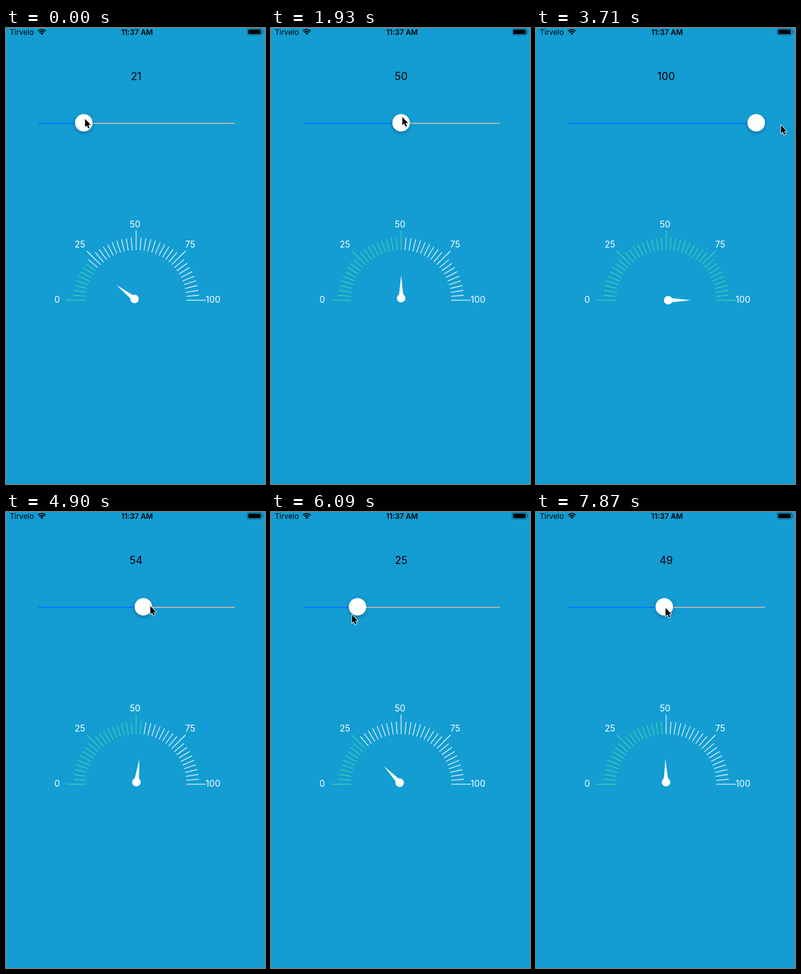
An HTML page with a canvas that plays this animation: 412 by 727 pixels, repeating every 8000 ms.

```html
<!DOCTYPE html>
<html lang="en">
<head>
<meta charset="utf-8">
<title>Gauge and slider</title>
<style>
  html, body { margin: 0; width: 100%; height: 100%; overflow: hidden; background: #139dd3; }
  canvas { display: block; }
</style>
</head>
<body>
<canvas id="stage" width="412" height="727"></canvas>
<script>
const ctx = document.getElementById('stage').getContext('2d');
const LOOP = 8000;
const STEP = 148.5;   // the picture advances in steps of this many ms
const LAG = 0.4;      // the thumb trails the hand by this many steps
const GRIP = 2;       // the pointer sits this far right of the thumb centre
const CENTER = { x: 207, y: 434 };
const FONT = 'Inter, Roboto, sans-serif';

// Where the hand pauses or turns: [step, gauge value], may pass both slider ends.
const HAND = [
  [0, 21.05], [5.6, 36.1], [12.6, 50.05], [19, 50.05], [24.6, 113], [27, 113],
  [30.5, 13], [32.6, 54.1], [34.6, 64.3], [40.6, 25.9], [44.6, -16.8],
  [46, -16.8], [52.6, 49.05]
];
const HEIGHT = [[0, 144], [13, 141], [19, 141], [25, 154], [27, 154],
  [33, 149], [41, 163], [46, 163], [53, 152]];

const clamp = (n, min, max) => Math.min(max, Math.max(min, n));
const thumbX = value => 63.3 + 2.87 * value;

// Smooth curve through the stops that never overshoots them.
function follow(stops, step) {
  const last = stops.length - 1;
  const t = clamp(step, stops[0][0], stops[last][0]);
  const i = clamp(stops.findIndex(stop => stop[0] >= t) - 1, 0, last - 1);
  const slope = n => n < 0 || n >= last ? 0
    : (stops[n + 1][1] - stops[n][1]) / (stops[n + 1][0] - stops[n][0]);
  const tangent = n => {
    const a = slope(n - 1), b = slope(n);
    return a * b > 0 ? 2 * a * b / (a + b) : 0;
  };
  const [t0, v0] = stops[i], [t1, v1] = stops[i + 1];
  const span = t1 - t0, p = (t - t0) / span, q = 1 - p;
  return v0 * q * q * (1 + 2 * p) + v1 * p * p * (3 - 2 * p)
    + span * p * q * (q * tangent(i) - p * tangent(i + 1));
}

function text(str, x, y, size, color, align = 'center', weight = 400) {
  ctx.font = `${weight} ${size}px ${FONT}`;
  ctx.textAlign = align;
  ctx.fillStyle = color;
  ctx.fillText(str, x, y);
}

function disc(x, y, r) {
  ctx.fillStyle = '#fff';
  ctx.beginPath();
  ctx.arc(x, y, r, 0, Math.PI * 2);
  ctx.fill();
}

function bar(x, y, w, h, radius, color) {
  ctx.fillStyle = color;
  ctx.beginPath();
  ctx.roundRect(x, y, w, h, radius);
  ctx.fill();
}

function drawStatusBar() {
  text('Tirvelo', 6, 11, 11.8, '#000', 'left');
  text('11:37 AM', 208.5, 11, 11.8, '#000', 'center', 600);

  ctx.strokeStyle = '#000';
  for (const [radius, width] of [[8.6, 1.9], [5.5, 1.9], [1.6, 3.2]]) {
    ctx.lineWidth = width;
    ctx.beginPath();
    ctx.arc(57, 11, radius, -Math.PI * 0.75, -Math.PI * 0.25);
    ctx.stroke();
  }

  ctx.strokeStyle = 'rgba(0,0,0,.4)';
  ctx.lineWidth = 1;
  ctx.beginPath();
  ctx.roundRect(383.5, 0.8, 23.5, 10.5, 2.5);
  ctx.stroke();
  bar(385.2, 2.4, 20, 7.4, 1.2, '#000');
  bar(408, 4.2, 1.3, 3.8, 0, 'rgba(0,0,0,.4)');
}

function drawSlider(value) {
  const x = thumbX(value);
  bar(50, 151, 314, 2, 1, '#b4b4b4');
  bar(50, 151, x - 50, 2, 1, '#007aff');
  ctx.save();
  ctx.shadowColor = 'rgba(0,0,0,.28)';
  ctx.shadowBlur = 6;
  ctx.shadowOffsetY = 2.5;
  disc(x, 151.2, 13.9);
  ctx.restore();
}

function drawGauge(value) {
  ctx.lineWidth = 1.1;
  for (let i = 0; i <= 40; i++) {
    const angle = Math.PI * (1 + i / 40);
    const outer = i % 10 ? 100 : 111;
    const c = Math.cos(angle), s = Math.sin(angle);
    ctx.strokeStyle = i * 2.5 <= value ? '#3fe0a0' : '#fff';
    ctx.beginPath();
    ctx.moveTo(CENTER.x + 80 * c, CENTER.y + 80 * s);
    ctx.lineTo(CENTER.x + outer * c, CENTER.y + outer * s);
    ctx.stroke();
  }

  for (let i = 0; i <= 4; i++) {
    const angle = Math.PI * (1 + i / 4);
    const lift = i === 2 ? 120 : 124;
    text(String(i * 25), 205.3 + 124 * Math.cos(angle),
      437.8 + lift * Math.sin(angle), 14, '#fff');
  }

  ctx.save();
  ctx.translate(CENTER.x, CENTER.y);
  ctx.rotate(Math.PI * (1 + value / 100));
  disc(3.3, 0, 6.8);
  ctx.beginPath();
  ctx.moveTo(7, -3.5);
  ctx.lineTo(40, 0);
  ctx.lineTo(7, 3.5);
  ctx.fill();
  ctx.restore();
}

const ARROW = new Path2D('M0 0V14.2L3.2 11.2L5.5 16.7L8 15.6L5.7 10.3H10Z');

function drawPointer(x, y) {
  ctx.save();
  ctx.translate(x, y + 1);
  ctx.scale(0.92, 0.92);
  ctx.lineJoin = 'round';
  ctx.lineWidth = 1.8;
  ctx.strokeStyle = '#fff';
  ctx.stroke(ARROW);
  ctx.fillStyle = '#000';
  ctx.fill(ARROW);
  ctx.restore();
}

function draw(time) {
  const step = Math.floor((time % LOOP + 11) / STEP);
  const value = clamp(follow(HAND, step - LAG), 0, 100);
  ctx.fillStyle = '#139dd3';
  ctx.fillRect(0, 0, 412, 727);
  drawStatusBar();
  text(String(Math.floor(value)), 207, 82.8, 16.8, '#000');
  drawSlider(value);
  drawGauge(value);
  drawPointer(thumbX(follow(HAND, step)) + GRIP, follow(HEIGHT, step));
}

const start = performance.now();
function tick() {
  draw(performance.now() - start);
  requestAnimationFrame(tick);
}
tick();
</script>
</body>
</html>
```
